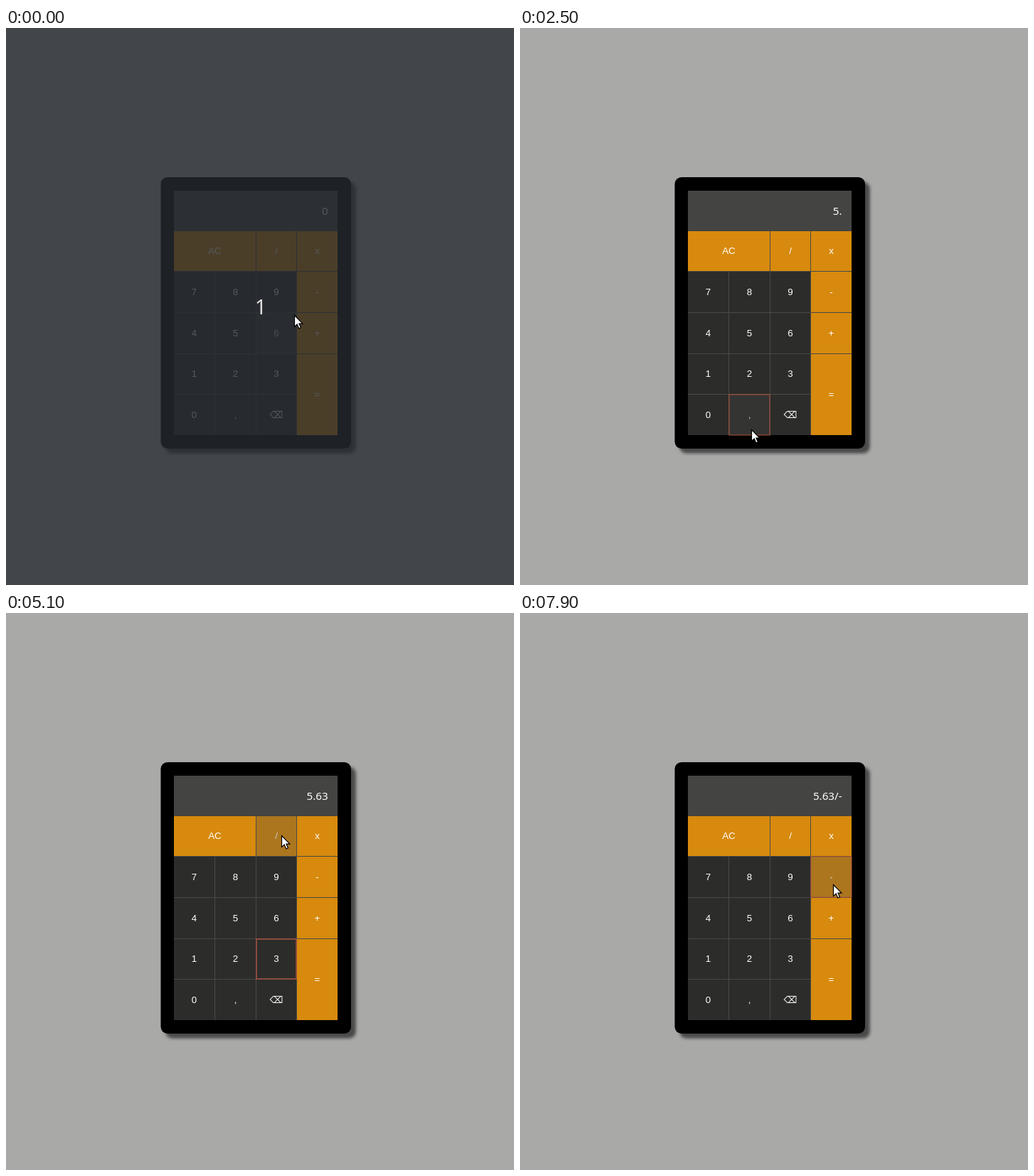
Animation of 714x784 px, one loop 8000 ms. Source, as an HTML page:

```html
<!DOCTYPE html>
<html lang="en">
<head>
<meta charset="utf-8">
<title>Calculator</title>
<style>
html, body { margin: 0; width: 100%; height: 100%; overflow: hidden; background: #a9a9a7; }
svg { display: block; width: 714px; height: 784px; }
.key { font: 13.33px "Liberation Sans", Arial, "DejaVu Sans", sans-serif; fill: #fff; text-anchor: middle; }
#out { font: 15.2px "Noto Sans", "Open Sans", sans-serif; fill: #fff; text-anchor: end; }
#count { font: 29px "Noto Sans", "Open Sans", sans-serif; fill: #dcdcdc; text-anchor: middle; }
</style>
</head>
<body>
<svg viewBox="0 0 714 784">
  <defs>
    <filter id="blur" x="-10%" y="-10%" width="120%" height="120%"><feGaussianBlur stdDeviation="2"/></filter>
  </defs>
  <rect width="714" height="784" fill="#a9a9a7"/>
  <rect x="224.3" y="216.8" width="267.5" height="382" rx="9.5" fill="#4a4a49" filter="url(#blur)"/>
  <rect x="217.5" y="210" width="267.5" height="382" rx="9.5"/>
  <rect x="236" y="229" width="230" height="57" fill="#444442"/>
  <text id="out" x="452.6" y="263"></text>
  <g id="keys"><rect x="236" y="286" width="230" height="287" fill="#494947"/></g>
  <rect id="ring" fill="none" stroke="#b4563f" stroke-width="1.8"/>
  <g id="dim">
    <rect width="714" height="784" fill="#272b31" opacity=".79"/>
    <text id="count" x="358" y="403">1</text>
  </g>
  <path id="cursor" d="M.5 .5v16l3.7-3.4 2.6 5.8 2.7-1.2-2.6-5.6h5z" fill="#fff" stroke="#000" stroke-width="1.2"/>
</svg>
<script>
const NS = "http://www.w3.org/2000/svg";
const $ = id => document.getElementById(id);
const LOOP = 8000, STEP = 100, PITCH = 57.6;
const DARK = "#2c2c2a", ORANGE = "#d78a0d";

const colX = col => Math.round(236.3 + PITCH * col);
const rowY = row => Math.round(285.7 + PITCH * row);

function set(el, attrs) {
  for (const name in attrs) el.setAttribute(name, attrs[name]);
  return el;
}
const add = (parent, tag, attrs) =>
  parent.appendChild(set(document.createElementNS(NS, tag), attrs));

const keys = {};
function addKey(label, col, row, cols = 1, rows = 1) {
  const x = colX(col), y = rowY(row);
  const width = colX(col + cols) - x - 1, height = rowY(row + rows) - y - 1;
  const box = { x, y, width, height };
  const g = add($("keys"), "g", { class: "key" });
  add(g, "rect", { ...box, fill: row === 0 || col === 3 ? ORANGE : DARK });
  add(g, "text", { x: x + width / 2, y: Math.floor(y + height / 2 + 4.6) }).textContent = label;
  keys[label] = { g, box };
}

addKey("AC", 0, 0, 2);
addKey("/", 2, 0);
["789", "456", "123", "0,⌫"].forEach((line, row) =>
  [...line].forEach((label, col) => addKey(label, col, row + 1)));
[..."x-+"].forEach((label, row) => addKey(label, 3, row));
addKey("=", 3, 3, 1, 2);

// pointer glides: start, end, x, y
const glides = [
  [0, 100, 381, 424], [100, 400, 327, 431],
  [1700, 2000, 325, 560], [2100, 2300, 325, 565], [2700, 3100, 386, 433],
  [3300, 3600, 382, 489], [3900, 4300, 425, 375], [4500, 4800, 405, 337], [4900, 5100, 387, 313],
  [6500, 6600, 396, 354], [6700, 6900, 428, 405], [6900, 7000, 439, 396],
  [7000, 7100, 441, 403], [7200, 7500, 439, 381], [7800, 7900, 440, 382]
];

// key presses: down, up, key
const presses = [
  [1600, 1600, "5"], [2400, 2400, ","], [3200, 3200, "6"],
  [3800, 3800, "3"], [6300, 6400, "/"], [7400, 7700, "-"]
];

function pointer(t) {
  let x = 405, y = 404;
  for (const [start, end, toX, toY] of glides) {
    const p = Math.min(1, Math.max(0, (t - start) / (end - start)));
    x += (toX - x) * p;
    y += (toY - y) * p;
  }
  return [Math.round(x), Math.round(y)];
}

const inside = (px, py, { x, y, width, height }) =>
  px >= x && px < x + width && py >= y && py < y + height;

function render(time) {
  const t = Math.floor(time / STEP) * STEP;
  const [px, py] = pointer(t);
  set($("cursor"), { transform: `translate(${px} ${py})` });
  for (const { g, box } of Object.values(keys))
    set(g, { opacity: inside(px, py, box) ? .7 : 1 });

  const last = presses.findLast(([down]) => down <= t);
  set($("ring"), { visibility: last ? "visible" : "hidden" });
  if (last) {
    const { box } = keys[last[2]];
    set($("ring"), { ...box, opacity: inside(px, py, box) ? .55 : .75 });
  }

  const typed = presses.filter(([, up]) => up <= t).map(([, , key]) => key);
  $("out").textContent = typed.join("").replace(",", ".") || "0";
  set($("dim"), { visibility: t < STEP ? "visible" : "hidden" });
}

const start = performance.now();
function tick() {
  render((performance.now() - start) % LOOP);
  requestAnimationFrame(tick);
}
render(0);
requestAnimationFrame(tick);
</script>
</body>
</html>
```
